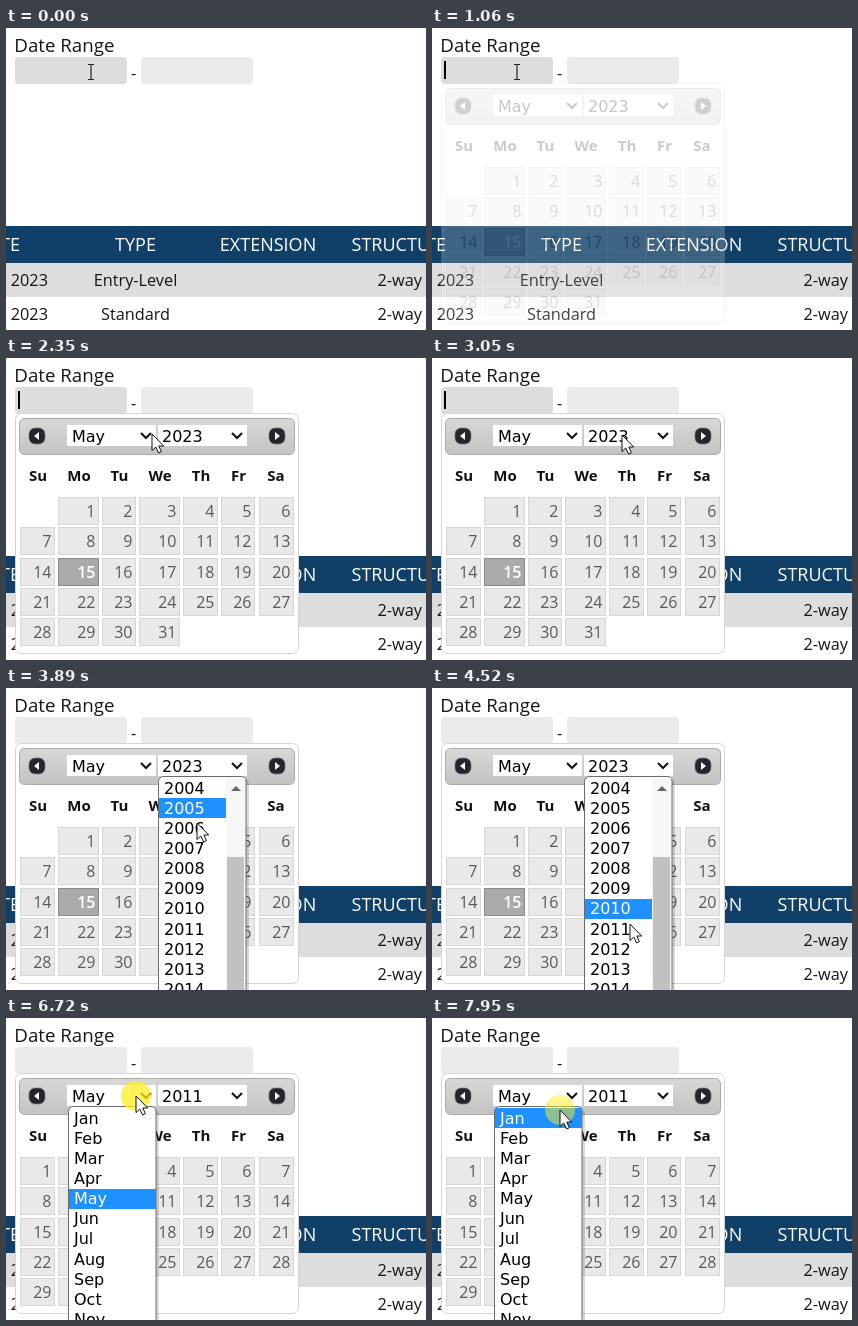
Recreate the animation shown at these times as an HTML page. Size 420x302 px, loop 8 s.

```html
<!DOCTYPE html>
<html lang="en">
<head>
<meta charset="utf-8">
<title>Date range picker</title>
<style>
  html, body { margin: 0; width: 420px; height: 302px; overflow: hidden; background: #fff; }
  svg { display: block; }
  text { font: 16.3px "Open Sans", sans-serif; fill: #151515; }
  .label { font-size: 18.7px; }
  .th { font-size: 18px; fill: #fff; }
  .dow { font-size: 15px; font-weight: 700; fill: #111; }
  .day { font-size: 16px; fill: #5a5a5a; }
  .today { fill: #fff; font-weight: 600; }
  .ui { font: 16px "DejaVu Sans", sans-serif; fill: #000; }
  .end { text-anchor: end; }
  .mid { text-anchor: middle; }
</style>
</head>
<body>
<svg id="stage" width="420" height="302" viewBox="0 0 420 302"></svg>
<script>
const LOOP = 8000, ROW = 20.15, LIST_TOP = 90;
const MONTHS = "Jan Feb Mar Apr May Jun Jul Aug Sep Oct Nov".split(" ");
const YEARS = Array.from({ length: 11 }, (_, i) => 2004 + i);
const COLUMNS = [[14, 49], [52, 93], [96, 130], [133, 174], [177, 212], [215, 249], [253, 288]];

const text = (x, y, s, cls = "") => `<text x="${x}" y="${y}" class="${cls}">${s}</text>`;
const rect = (x, y, w, h, fill, more = "") =>
  `<rect x="${x}" y="${y}" width="${w}" height="${h}" fill="${fill}" ${more}/>`;
const path = (d, more) => `<path d="${d}" ${more}/>`;
const group = (id, body, more = "") => `<g id="${id}" ${more}>${body}</g>`;

function table() {
  return rect(0, 198, 420, 37, "#104068") + rect(0, 235, 420, 34, "#ddd") +
    text(14, 223, "DATE", "th end") + text(129.5, 223, "TYPE", "th mid") +
    text(262, 223, "EXTENSION", "th mid") + text(345.5, 223, "STRUCTURE", "th") +
    ["Entry-Level", "Standard"].map((type, i) => {
      const y = 258 + 34 * i;
      return text(42, y, "2023", "end") + text(129.5, y, type, "mid") + text(371.5, y, "2-way");
    }).join("");
}

function days(firstColumn, today) {
  let out = "";
  for (let d = 1; d <= 31; d++) {
    const slot = d - 1 + firstColumn, [left, right] = COLUMNS[slot % 7];
    const top = 139 + Math.round(30.3 * Math.floor(slot / 7));
    const on = d === today;
    out += rect(left + .5, top + .5, right - left - 1, 27, on ? "#aaa" : "#e9e9e9",
      `stroke="${on ? "#8a8a8a" : "#d6d6d6"}"`) +
      text(right - 3.5, top + 20, d, "day end" + (on ? " today" : ""));
  }
  return out;
}

function navButton(x, dir) {
  return rect(x - 8, 70, 16, 16, "#25252d", 'rx="6" stroke="#777" stroke-width=".7"') +
    path(`M${x + 3 * dir} 78l${-5 * dir} -4v8z`, 'fill="#fff"');
}

function select(x, body) {
  return rect(x, 67, 89, 21, "#fff") + body +
    path(`M${x + 74} 75l5 5 5-5`, 'fill="none" stroke="#111" stroke-width="2"');
}

function calendar() {
  return rect(9.5, 55.5, 283, 240, "#fff", 'rx="6" stroke="#d4d4d4"') +
    rect(13.5, 60.5, 275, 36, "url(#bar)", 'rx="5" stroke="#aaa"') +
    navButton(31, -1) + navButton(271, 1) +
    select(61, text(66, 84, "May", "ui")) +
    select(152, '<text id="year" x="156" y="84" class="ui"></text>') +
    "Su Mo Tu We Th Fr Sa".split(" ").map((d, i) =>
      text([32, 73, 113.5, 154, 195, 232.5, 270][i], 123, d, "dow mid")).join("") +
    group("days2023", days(1, 15)) + group("days2011", days(0));
}

function list(id, x, items, innerWidth, extra = "") {
  return group(id,
    rect(x + 2, 91, 89, 230, "#000", 'rx="5" opacity=".15"') +
    rect(x + .5, 88.5, 87.5, 230, "#fff", 'rx="5" stroke="#6a6a6a"') + extra +
    rect(x + 1, 0, innerWidth, 20, "#1e90ff", 'class="hot"') +
    items.map((s, i) => text(x + 6, (LIST_TOP + ROW * i + 15.5).toFixed(1), s, "ui item")).join(""));
}

const scrollbar = rect(220, 90, 19, 220, "#f6f6f6") + rect(221, 169, 17, 150, "#c1c1c1") +
  path("M225 103l5-5 5 5z", 'fill="#666"');

const cursors =
  group("beam", path("M-3 -7.5h2.5l.5 .5 .5-.5H3M0 -7V7M-3 7.5h2.5l.5-.5 .5 .5H3", 'fill="none" stroke="#222" stroke-width="1.2"')) +
  group("arrow", path("M0 0V16.5L3.8 13 6.6 19 9.4 17.7 6.8 12H11.7Z", 'fill="#fff" stroke="#111"')) +
  group("hand", path("M-1.8 13V1.2Q-1.8 -.5 0 -.5T1.8 1.2V8Q2 6.6 3.4 6.8T5 8.6Q5.2 7.4 6.5 7.7T7.8 9.6Q9.5 8.6 9.8 10.6V15Q9.8 18 8 20V23H-1V20.5Q-4 17-6.5 12.6Q-7 10.6-5.2 10.5T-1.8 13ZM2 8V12M5 9V12M7.8 10V12",
    'fill="#fff" stroke="#111"'));

const stage = document.getElementById("stage");
stage.innerHTML =
  `<defs><linearGradient id="bar" x2="0" y2="1"><stop stop-color="#d8d8d8"/><stop offset="1" stop-color="#c3c3c3"/></linearGradient></defs>` +
  text(8.3, 24, "Date Range", "label") +
  rect(9, 29, 112, 27, "#ddd", 'rx="4" id="field"') + text(125, 51, "-") +
  rect(135, 29, 112, 27, "#ebebeb", 'rx="4"') +
  rect(12, 33, 2, 18, "#000", 'id="caret"') +
  table() + group("calendar", calendar()) +
  list("yearList", 152, YEARS, 67, scrollbar) + list("monthList", 62, MONTHS, 87) +
  group("pointer", '<circle id="halo" r="15" fill="#ffec1f"/>' + cursors);

const $ = id => document.getElementById(id);
const show = (id, on) => { $(id).style.display = on ? "" : "none"; };
const within = (t, spans) => spans.some(([a, b]) => t >= a && t < b);

const easeIn = p => u => u ** p;
const easeOut = p => u => 1 - (1 - u) ** p;
const smooth = u => u * u * (3 - 2 * u);

// first step, last step, number of steps, end point, easing
const MOVES = [
  [1520, 2350, 13, 146, 76, easeIn(1.5)],
  [2420, 2990, 9, 190, 77, easeOut(1.5)],
  [3470, 3890, 7, 191, 135, easeIn(1.3)],
  [3960, 4590, 10, 199, 243, easeOut(1.2)],
  [5550, 6520, 15, 129.5, 78, smooth],
  [7260, 7750, 8, 128, 92, smooth]
];
const CARET = [[990, 1520], [1990, 2490], [2990, 3060], [5140, 5690], [6190, 6720]];
const CLICKS = [[920, 990], [3060, 3130], [4940, 5010], [6720, 6790], [7950, LOOP]];

function pointerAt(t) {
  let x = 85, y = 44;
  for (const [start, end, steps, toX, toY, ease] of MOVES) {
    if (t < start) break;
    const step = Math.floor((t - start) / (end - start) * (steps - 1) + .01) + 1;
    const u = ease(Math.min(1, step / steps));
    x += (toX - x) * u;
    y += (toY - y) * u;
  }
  return [x, y];
}

function highlight(id, row) {
  const hot = $(id).querySelector(".hot");
  hot.style.display = row < 0 ? "none" : "";
  hot.setAttribute("y", Math.round(LIST_TOP + ROW * row));
  $(id).querySelectorAll(".item").forEach((el, i) => { el.style.fill = i === row ? "#fff" : ""; });
}

function draw(t) {
  const [x, y] = pointerAt(t);
  const yearOpen = within(t, [[3060, 5010]]), monthOpen = t >= 6720;
  const picked = t >= 5010;

  const fadeTime = 1060 + Math.floor((t - 1060) / 65) * 65;
  $("calendar").setAttribute("opacity", smooth(Math.max(0, Math.min(1, (fadeTime - 1005) / 185))));
  $("year").textContent = picked ? 2011 : 2023;
  show("days2023", !picked);
  show("days2011", picked);
  $("field").setAttribute("fill", yearOpen || monthOpen ? "#ebebeb" : "#ddd");
  show("caret", within(t, CARET));

  // The highlighted row trails the pointer by one step.
  const row = Math.floor((pointerAt(t - 70)[1] - LIST_TOP) / ROW);
  show("yearList", yearOpen);
  show("monthList", monthOpen);
  if (yearOpen) highlight("yearList", row);
  if (monthOpen) highlight("monthList", row < 0 ? 4 : row);

  const cursor = y < 56 ? "beam" : y > 138 && !yearOpen ? "hand" : "arrow";
  for (const id of ["beam", "arrow", "hand"]) show(id, id === cursor);
  $("pointer").setAttribute("transform", `translate(${Math.round(x)} ${Math.round(y)})`);
  show("halo", within(t, CLICKS));
  $("halo").setAttribute("opacity", t >= 7950 ? .5 : .75);
}

function tick() {
  draw(performance.now() % LOOP);
  requestAnimationFrame(tick);
}
tick();
</script>
</body>
</html>
```
